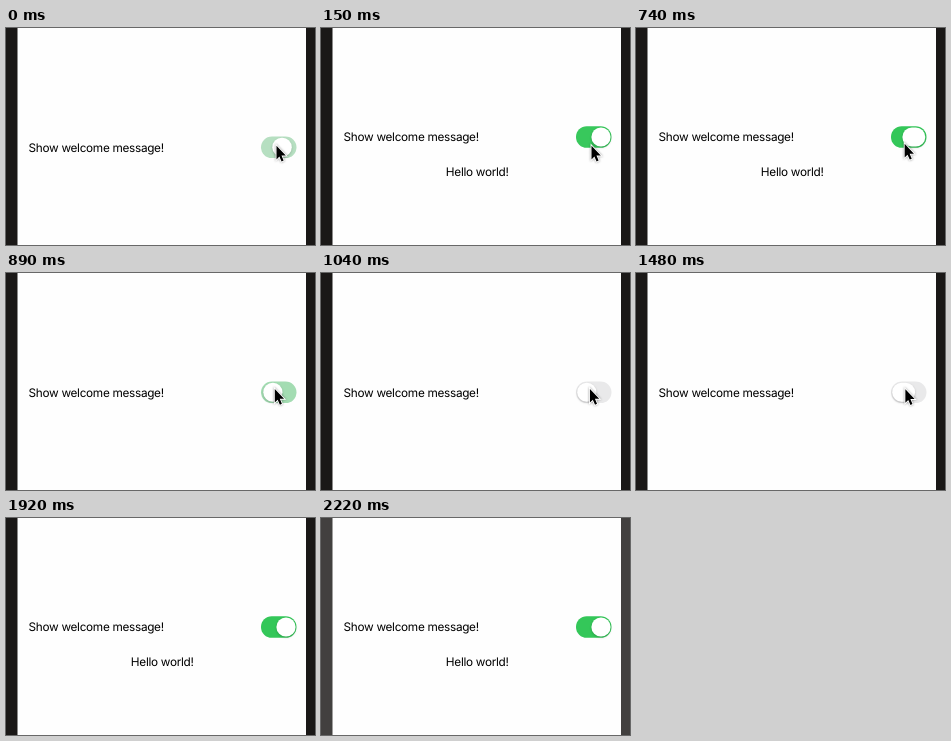
An HTML page that plays this animation: 309 by 217 pixels, repeating every 2.32 s.

```html
<!DOCTYPE html>
<html lang="en">
<meta charset="utf-8">
<title>Toggle demo</title>
<style>
  html, body { margin: 0; width: 100%; height: 100%; overflow: hidden; background: #fefefe; }
  svg { display: block; }
  text { font: 11.8px Inter, "Liberation Sans", sans-serif; letter-spacing: -.31px; text-rendering: geometricPrecision; }
  #knob { filter: drop-shadow(0 1px 1px rgba(0, 0, 0, .2)); }
  #cursor { filter: drop-shadow(0 .7px .8px rgba(0, 0, 0, .4)); }
</style>
<svg width="309" height="217" viewBox="0 0 309 217">
  <rect width="309" height="217" fill="#fefefe"/>
  <path id="bezel" d="M0 0H11.5V217H0ZM300 0H309V217H300Z"/>
  <g id="row">
    <text x="22.6" y="4.2">Show welcome message!</text>
    <rect id="track" x="255" y="-10.8" width="35.5" height="21.6" rx="10.8"/>
    <rect id="knob" y="-9.5" height="19" rx="9.5" fill="#fff"/>
  </g>
  <text id="hello" x="156.2" y="148.2" text-anchor="middle">Hello world!</text>
  <path id="cursor" d="M.5 .8V14.4L3.4 11.6L5.6 16.5L7.6 15.6L5.5 10.6H9.8Z" stroke="#fff" stroke-width="1.8" paint-order="stroke"/>
</svg>
<script>
  const LOOP = 2320, TICK = 147.5, FADE = 2212;
  const FLIPS = [-91, 735, 1484];   // on, off, on
  const SWITCH = 260;               // duration of one flip
  const LEFT = 256.2, RIGHT = 289.6, KNOB = 19.2;
  const OFF = [233, 233, 234], ON = [52, 199, 89];
  const PATH = [[0, 270, 117], [300, 270, 117], [590, 268, 115], [1622, 269, 115.5], [1770, 281, 198]];

  const $ = id => document.getElementById(id);
  const clamp = v => Math.min(1, Math.max(0, v));
  const mix = (a, b, k) => a + (b - a) * k;
  const smooth = x => x * x * (3 - 2 * x);
  const easeOut = x => 1 - (1 - x) ** 3;
  const set = (id, attrs) => Object.entries(attrs).forEach(([k, v]) => $(id).setAttribute(k, v));

  function cursorAt(t) {
    const i = Math.max(1, PATH.findIndex(p => p[0] >= t));
    const [a, b] = [PATH[i - 1], PATH[i]];
    const k = clamp((t - a[0]) / (b[0] - a[0]));
    return [mix(a[1], b[1], k), mix(a[2], b[2], k)];
  }

  function draw(now) {
    const t = Math.floor(now % LOOP / TICK) * TICK;
    const flip = FLIPS.findLastIndex(f => f <= t);
    const x = clamp((t - FLIPS[flip]) / SWITCH);
    const level = ease => flip % 2 ? 1 - ease(x) : ease(x);

    const green = level(smooth);
    const shown = green > .5;
    const press = Math.max(...FLIPS.map(f => clamp(1.1 - Math.abs(t - f) / 90)));
    const width = KNOB + 3.7 * press;

    set('row', { transform: `translate(0 ${shown ? 109 : 119.3})` });
    set('track', { fill: `rgb(${OFF.map((c, i) => Math.round(mix(c, ON[i], green)))})` });
    set('knob', { x: mix(LEFT, RIGHT - width, level(easeOut)), width });
    set('hello', { visibility: shown ? 'visible' : 'hidden' });
    set('cursor', {
      transform: `translate(${cursorAt(t)})`,
      visibility: t <= PATH.at(-1)[0] ? 'visible' : 'hidden'
    });
    set('bezel', { fill: t < FADE ? '#1a1817' : '#42403f' });
  }

  function frame() {
    draw(performance.now());
    requestAnimationFrame(frame);
  }
  frame();
</script>
</html>
```
